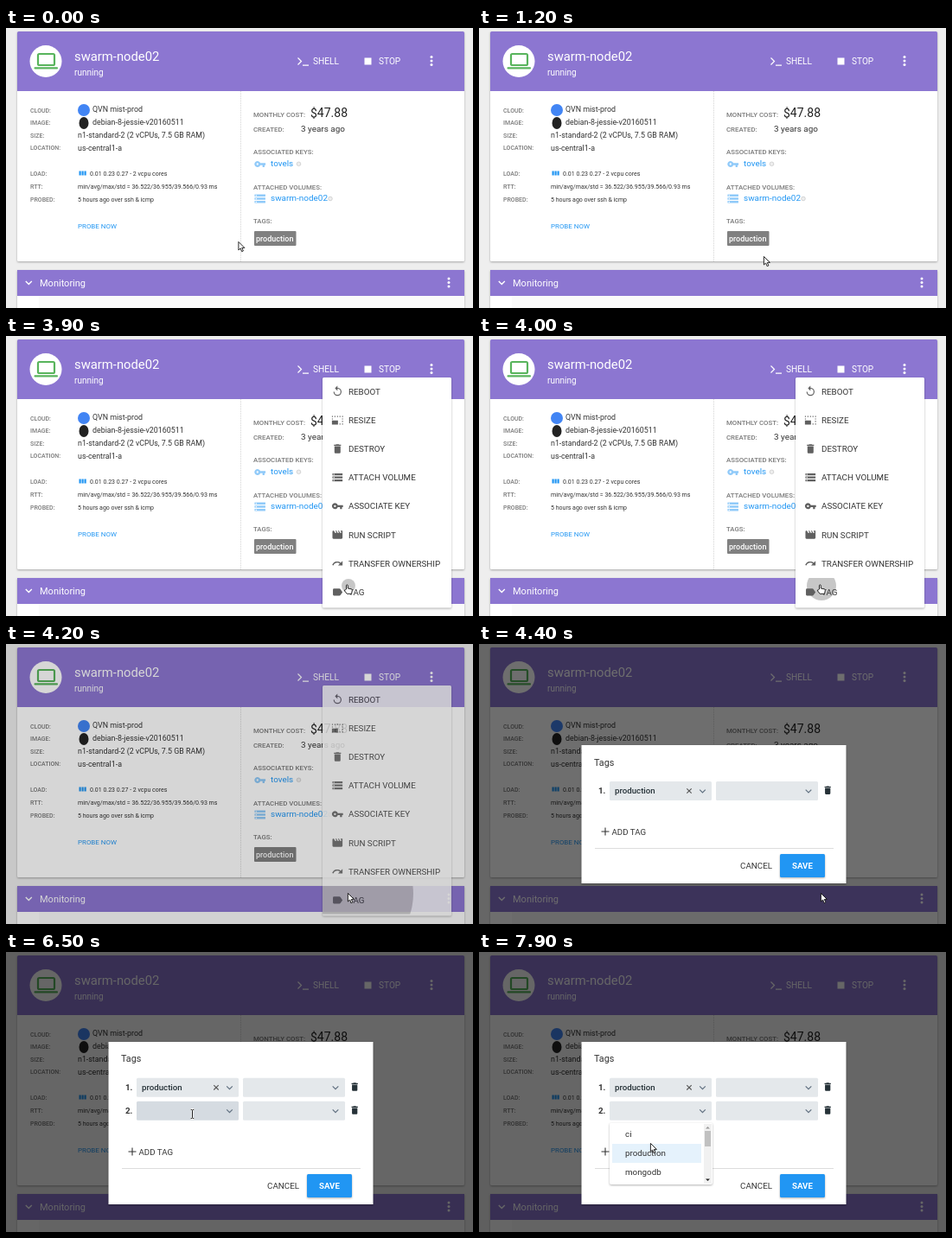
These frames come from a looping animation (540x324 px, 8000 ms). An HTML page:

```html
<!DOCTYPE html>
<html lang="en">
<head>
<meta charset="utf-8">
<title>Tagging a machine</title>
<style>
  html, body { margin: 0; width: 100%; height: 100%; overflow: hidden; background: #eee; }
  svg { display: block; width: 540px; height: 324px; font-family: Roboto, "Open Sans", sans-serif; }
  text { white-space: pre; }
  .shade { filter: drop-shadow(0 1px 1px rgba(0, 0, 0, .3)); }
</style>
</head>
<body>
<svg id="stage" viewBox="0 0 540 324"></svg>
<script>
const LOOP = 8000, STEP = 100;
const PURPLE = '#8c76d1', BLUE = '#2196f3', PALE = '#90caf9', LABEL = '#7a7a7a', INK = '#333';
const stage = document.getElementById('stage');

// Icon outlines on a 24 unit grid
const ICONS = {
  replay: 'M12 5V1L7 6l5 5V7a6 6 0 1 1-6 6H4a8 8 0 1 0 8-8z',
  resize: 'M1 13h12v8H1zM1 9h2v2H1zM1 4h2v2H1zM6 4h2v2H6zM11 4h2v2h-2zM16 4h2v2h-2zM21 4h2v2h-2zM21 9h2v2h-2zM21 14h2v2h-2zM21 19h2v2h-2zM16 19h2v2h-2z',
  trash: 'M6 19a2 2 0 0 0 2 2h8a2 2 0 0 0 2-2V7H6zM19 4h-3.500l-1-1h-5l-1 1H5v2h14z',
  storage: 'M2 20h20v-4H2zm2-3h2v2H4zM2 4v4h20V4zm4 3H4V5h2zm-4 7h20v-4H2zm2-3h2v2H4z',
  key: 'M12.650 10A6 6 0 1 0 12.650 14H17v4h4v-4h2v-4zM7 14a2 2 0 1 1 0-4 2 2 0 0 1 0 4z',
  film: 'M18 4l2 4h-3l-2-4h-2l2 4h-3l-2-4H8l2 4H7L5 4H4a2 2 0 0 0-2 2v12a2 2 0 0 0 2 2h16a2 2 0 0 0 2-2V4z',
  forward: 'M18.400 10.600A10.500 10.500 0 0 0 1.540 15.220L3.900 16A8 8 0 0 1 16.620 12.380L13 16h9V7z',
  label: 'M17.630 5.840A2 2 0 0 0 16 5H5a2 2 0 0 0-2 2v10a2 2 0 0 0 2 2h11a2 2 0 0 0 1.630-.840L22 12z'
};
const MENU = [
  ['replay', 'REBOOT'], ['resize', 'RESIZE'], ['trash', 'DESTROY'], ['storage', 'ATTACH VOLUME'],
  ['key', 'ASSOCIATE KEY'], ['film', 'RUN SCRIPT'], ['forward', 'TRANSFER OWNERSHIP'], ['label', 'TAG']
];

const text = (x, y, size, str, fill = INK, weight = 400) =>
  `<text x="${x}" y="${y}" font-size="${size}" fill="${fill}" font-weight="${weight}">${str}</text>`;
const rect = (x, y, w, h, fill, more = '') =>
  `<rect x="${x}" y="${y}" width="${w}" height="${h}" fill="${fill}" ${more}/>`;
const dot = (x, y, r, fill) => `<circle cx="${x}" cy="${y}" r="${r}" fill="${fill}"/>`;
const line = (d, color, w = 1) => `<path d="${d}" fill="none" stroke="${color}" stroke-width="${w}"/>`;
const icon = (name, x, y, size, fill) =>
  `<path d="${ICONS[name]}" fill="${fill}" fill-rule="evenodd" transform="translate(${x - size / 2} ${y - size / 2}) scale(${size / 24})"/>`;
const kebab = (x, y) => [-4.5, 0, 4.5].map(d => dot(x, y + d, 1.5, '#fff')).join('');
const chevron = (x, y, r, color, w) => line(`M${x - r} ${y - r / 2}l${r} ${r}l${r} ${-r}`, color, w);
const group = (id, body, more = '') => `<g id="${id}" ${more}>${body}</g>`;

function header() {
  return rect(13, 4, 517, 266, '#fff', 'rx="1.5" class="shade"') +
    `<path d="M13 73V5.500a1.500 1.500 0 0 1 1.500-1.500h514a1.500 1.500 0 0 1 1.500 1.500V73z" fill="${PURPLE}"/>` +
    dot(46, 38.5, 18.5, '#fff') +
    `<rect x="37" y="30" width="19" height="13" rx="1.500" fill="none" stroke="#58b45c" stroke-width="2.200"/>` +
    rect(32.5, 45.2, 27.5, 2.3, '#58b45c', 'rx="1"') +
    text(79, 37.5, 14.8, 'swarm-node02', '#fff') + text(79, 55, 10, 'running', '#fff') +
    line('M337.500 34.500l4 4l-4 4M343 43.200h7', '#fff', 1.2) + text(355, 42, 10.2, 'SHELL', '#fff') +
    rect(414.5, 34.5, 8, 8, '#fff') + text(431, 42, 10.1, 'STOP', '#fff') + kebab(492, 38);
}

function details() {
  const labels = [['CLOUD', 97.5], ['IMAGE', 111.7], ['SIZE', 126.7], ['LOCATION', 141.3],
    ['LOAD', 171], ['RTT', 186], ['PROBED', 200.5]];
  return labels.map(([s, y]) => text(28, y, 7, s + ':', LABEL, 500)).join('') +
    dot(90, 95, 7, '#4285f4') +
    '<ellipse cx="90" cy="110" rx="5.500" ry="7" fill="#222"/>' +
    text(100, 97.4, 8.9, 'QVN mist-prod') +
    text(100, 112, 8.85, 'debian-8-jessie-v20160511') +
    text(83, 127, 8.85, 'n1-standard-2 (2 vCPUs, 7.5 GB RAM)') +
    text(83, 141.5, 8.85, 'us-central1-a') +
    [84.5, 87.5, 90.5].map(x => rect(x, 165.5, 2.2, 5, BLUE)).join('') +
    text(97, 171, 7, '0.01 0.23 0.27 - 2 vcpu cores') +
    text(83, 186, 7.05, 'min/avg/max/std = 36.522/36.955/39.566/0.93 ms') +
    text(83, 200.5, 7, '5 hours ago over ssh &amp; icmp') +
    text(83, 232.3, 7.95, 'PROBE NOW', BLUE) +
    '<path d="M271.500 73V270" stroke="#d4d4d4" stroke-dasharray="1 1"/>';
}

function summary() {
  const labels = [['MONTHLY COST', 103], ['CREATED', 119.5], ['ASSOCIATED KEYS', 146],
    ['ATTACHED VOLUMES', 186.5], ['TAGS', 226]];
  const ring = (x, y) => `<circle cx="${x}" cy="${y}" r="2.300" fill="#eee" stroke="#ccc" stroke-width=".8"/>`;
  return labels.map(([s, y]) => text(286, y, 7.85, s + ':', LABEL, 500)).join('') +
    text(352, 103, 14, '$47.88', '#222') + text(341, 119.8, 9.95, '3 years ago') +
    icon('key', 293.7, 157.5, 14, PALE) + text(306, 160.3, 9.9, 'tovels', BLUE) + ring(338.5, 157.3) +
    icon('storage', 293.7, 197.5, 15, PALE) + text(306, 200.3, 9.95, 'swarm-node02', BLUE) + ring(375, 197.5) +
    rect(287, 235, 48.5, 17, '#808080', 'rx="1"') + text(289, 247, 9, 'production', '#fff', 500);
}

function monitoring() {
  return rect(13, 280, 517, 60, '#fff', 'class="shade"') + rect(13, 280, 517, 30, PURPLE) +
    rect(38, 310, 492, 14, '#fafafa') +
    chevron(26.3, 294.8, 3.5, '#fff', 1.4) + text(39, 298.6, 11, 'Monitoring', '#fff') + kebab(512, 294.5);
}

function menu() {
  const rows = MENU.map(([name, s], i) => {
    const y = 64 + i * 33.2;
    return icon(name, 383.3, y, 14, '#606060') + text(396, y + 3.5, 9.8, s);
  }).join('');
  return rect(366, 48, 149, 266.5, '#fff', 'rx="1.5" class="shade"') +
    '<circle id="ripple" cx="396" cy="289" clip-path="url(#row)" fill="#000" fill-opacity=".22"/>' + rows;
}

function tagRow(id, number, y, value) {
  const field = x => rect(x, y - 11, 118, 22, '#e4e8eb', 'rx="1.5" class="field"');
  const filled = value ? text(157, y + 3.3, 9.7, value, '#263238', 500) +
    line(`M240.300 ${y - 2.7}l5.400 5.400m0 -5.400l-5.400 5.400`, '#555', 1.1) : '';
  return group(id, text(138, y + 3, 9.8, number + '.', INK, 700) + field(151) + field(274) + filled +
    chevron(258.5, y + .3, 3.3, '#607080', 1.2) + chevron(381, y + .3, 3.3, '#607080', 1.2) +
    icon('trash', 403.2, y - .8, 12.5, '#263238'));
}

function dialog() {
  const foot = line('M146 212.500v9M141.500 217h9', INK, 1.1) + text(153.5, 220.5, 9.7, 'ADD TAG') +
    line('M134 236.500H410', '#ddd') + text(302, 259.8, 9.8, 'CANCEL') +
    rect(348, 243, 52, 27, BLUE, 'rx="1.5" class="shade"') + text(362, 260, 9.7, 'SAVE', '#fff', 700);
  return rect(118.5, 117, 306, 160, '#fff', 'id="panel" class="shade"') +
    group('top', text(133, 140.5, 10.8, 'Tags') + tagRow('row1', 1, 170, 'production') + tagRow('row2', 2, 197, '')) +
    group('foot', foot);
}

function options() {
  return rect(151, 197.5, 119, 71.5, '#fff', 'rx="2" class="shade"') +
    rect(154, 200, 103, 22, '#e5f2fc', 'id="hover"') +
    ['ci', 'production', 'mongodb'].map((s, i) => text(169, 214.3 + i * 22, 9.8, s)).join('') +
    rect(260, 199, 9, 69, '#f1f1f1') + rect(261, 207, 7, 18, '#c1c1c1') +
    '<path d="M262 204.500h5l-2.500-2.500z" fill="#999"/><path d="M262 262.500h5l-2.500 2.500z" fill="#222"/>';
}

function pointers() {
  const outline = 'fill="#fff" stroke="#111" stroke-width=".9" stroke-linejoin="round"';
  return group('arrow', `<path d="M.4 .4V10l2.200-2 1.600 3.700 1.700-.8-1.600-3.500h3.100z" ${outline}/>`) +
    group('hand', `<path d="M-1.500 5.500V1.300a.9 .9 0 0 1 1.800 0V4.500l4 .8q1.200 .3 1 1.500l-.7 4H-.8L-3.400 7.500q-.4-1.500 .8-1.300z" ${outline}/>`) +
    group('beam', line('M-2.500 -5.500h5M-2.500 5.500h5M0 -5.500v11', '#fff', 2) +
      line('M-2 -5.300q2 0 2 1.300q0 -1.300 2 -1.300M-2 5.300q2 0 2 -1.300q0 1.300 2 1.300M0 -4v8', '#222', 1));
}

stage.innerHTML =
  '<defs><clipPath id="row"><path d="M366 280H515V312.500H366z"/></clipPath></defs>' +
  rect(0, 0, 540, 324, '#eee') + header() + details() + summary() + monitoring() +
  group('menu', menu()) + rect(0, 0, 540, 324, '#000', 'id="dim"') +
  group('dialog', dialog()) + group('options', options()) + pointers();

const part = id => document.getElementById(id);
const set = (id, name, value) => part(id).setAttribute(name, value);
const show = (id, on) => set(id, 'display', on ? 'inline' : 'none');
const during = (t, from, to) => t >= from && t < to;

// Time, x, y and pointer; the first stretch glides, later stops jump
const GLIDE_END = 2100;
const PATH = [
  [0, 268.5, 247, 'arrow'], [300, 268.5, 247, 'arrow'], [700, 300, 230, 'arrow'],
  [1000, 354, 252, 'arrow'], [1200, 329, 264, 'arrow'], [2100, 494, 42.5, 'hand'],
  [3900, 395, 287.5, 'hand'], [4200, 395, 288, 'arrow'], [4700, 317, 272, 'arrow'],
  [4900, 258, 203, 'arrow'], [5100, 196, 206, 'arrow'], [5300, 171, 211.5, 'hand'],
  [6100, 210, 196, 'arrow'], [6300, 210, 190, 'arrow'], [6500, 215.5, 187.5, 'beam'],
  [6900, 214.5, 190, 'beam'], [7000, 211, 194, 'arrow'], [7500, 200, 226, 'arrow'],
  [7700, 198.5, 223.5, 'arrow'], [7900, 198, 221, 'arrow']
];

function pointerAt(t) {
  const i = PATH.findLastIndex(p => p[0] <= t);
  const [t0, x, y, kind] = PATH[i];
  if (t >= GLIDE_END) return { x, y, kind };
  const [t1, nx, ny] = PATH[i + 1], k = (t - t0) / (t1 - t0);
  return { x: x + (nx - x) * k, y: y + (ny - y) * k, kind };
}

function draw(time) {
  const t = Math.floor(time / STEP) * STEP;
  const fading = t >= 4200, grown = t >= 5700;

  show('menu', during(t, 3900, 4400));
  set('menu', 'opacity', fading ? .85 : 1);
  set('ripple', 'r', fading ? 75 : t >= 4000 ? 17 : 8);
  set('dim', 'opacity', t >= 4500 ? .6 : t >= 4400 ? .57 : fading ? .16 : 0);

  show('dialog', t >= 4400);
  set('panel', 'y', grown ? 104 : 117);
  set('panel', 'height', grown ? 188 : 160);
  set('top', 'transform', `translate(0 ${grown ? -13.2 : 0})`);
  set('foot', 'transform', `translate(0 ${grown ? 14 : 0})`);
  show('row2', grown);
  part('row2').querySelector('.field').setAttribute('fill', during(t, 6500, 7400) ? '#d5dbe1' : '#e4e8eb');

  show('options', t >= 7400);
  set('hover', 'y', t >= 7900 ? 222 : 200);

  const p = pointerAt(t);
  for (const id of ['arrow', 'hand', 'beam']) show(id, id === p.kind);
  set(p.kind, 'transform', `translate(${p.x} ${p.y})`);
}

function tick() {
  draw(performance.now() % LOOP);
  requestAnimationFrame(tick);
}
tick();
</script>
</body>
</html>
```
